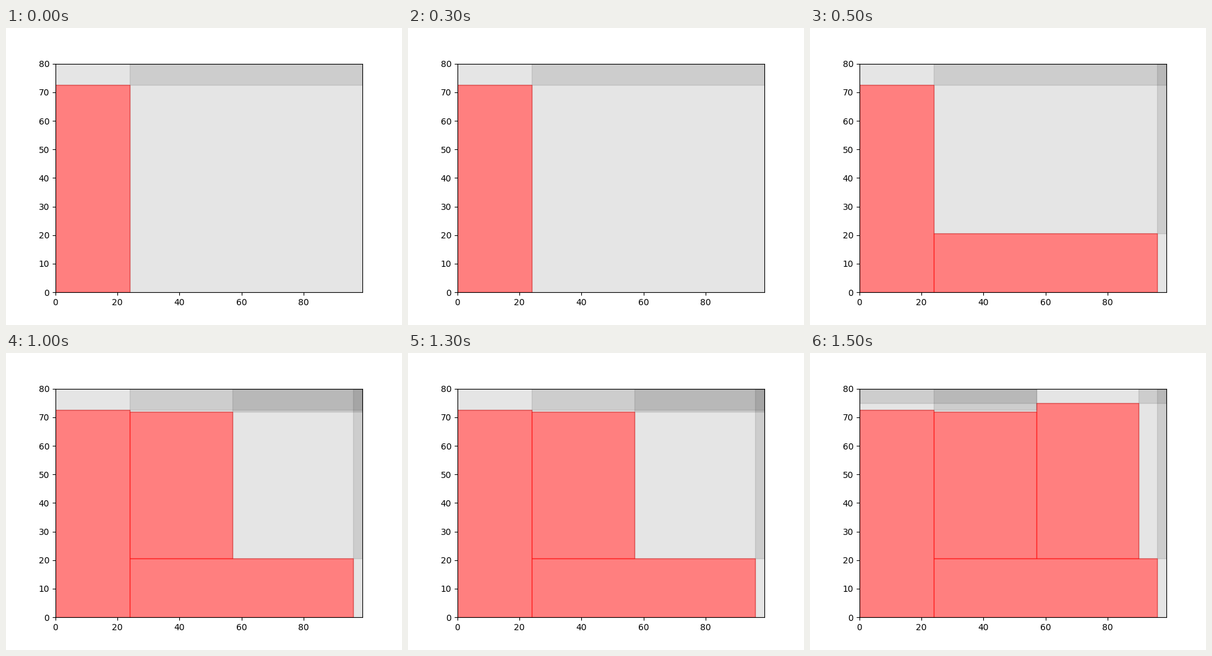
These frames come from a looping animation (640x480 px, 2000 ms). A matplotlib script:

```python
import matplotlib.pyplot as plt
from matplotlib.animation import FuncAnimation
from matplotlib.patches import Rectangle

BIN = (0, 0, 99, 80)
# Placed boxes as x, y, width, height
BOXES = [
    (0, 0, 24, 72.5),
    (24, 0, 72, 20.5),
    (24, 20.5, 33, 51.5),
    (57, 20.5, 33, 54.5),
]


def overlaps(a, b):
    return (a[0] < b[0] + b[2] and b[0] < a[0] + a[2]
            and a[1] < b[1] + b[3] and b[1] < a[1] + a[3])


def contains(a, b):
    return (a[0] <= b[0] and a[1] <= b[1]
            and a[0] + a[2] >= b[0] + b[2] and a[1] + a[3] >= b[1] + b[3])


def split(space, box):
    """Largest rectangles left of a free space once a box is placed."""
    if not overlaps(space, box):
        return [space]
    x, y, w, h = space
    bx, by, bw, bh = box
    parts = [
        (x, y, bx - x, h),
        (bx + bw, y, x + w - bx - bw, h),
        (x, y, w, by - y),
        (x, by + bh, w, y + h - by - bh),
    ]
    return [p for p in parts if p[2] > 0 and p[3] > 0]


def free_spaces(boxes):
    spaces = [BIN]
    for box in boxes:
        parts = {p for s in spaces for p in split(s, box)}
        spaces = sorted(p for p in parts
                        if not any(q != p and contains(q, p) for q in parts))
    return spaces


def add_rect(rect, color, alpha):
    x, y, w, h = rect
    ax.add_patch(Rectangle((x, y), w, h, color=color, alpha=alpha))


def draw(step):
    for patch in list(ax.patches):
        patch.remove()
    placed = BOXES[:step + 1]
    for box in placed:
        add_rect(box, "red", 0.5)
    for space in free_spaces(placed):
        add_rect(space, "black", 0.1)
    return ax.patches


fig, ax = plt.subplots(figsize=(6.4, 4.8), dpi=100)
ax.set_xlim(0, BIN[2])
ax.set_ylim(0, BIN[3])

anim = FuncAnimation(fig, draw, frames=len(BOXES), interval=500,
                     init_func=lambda: draw(0), repeat=True, repeat_delay=0)
plt.show()
```
